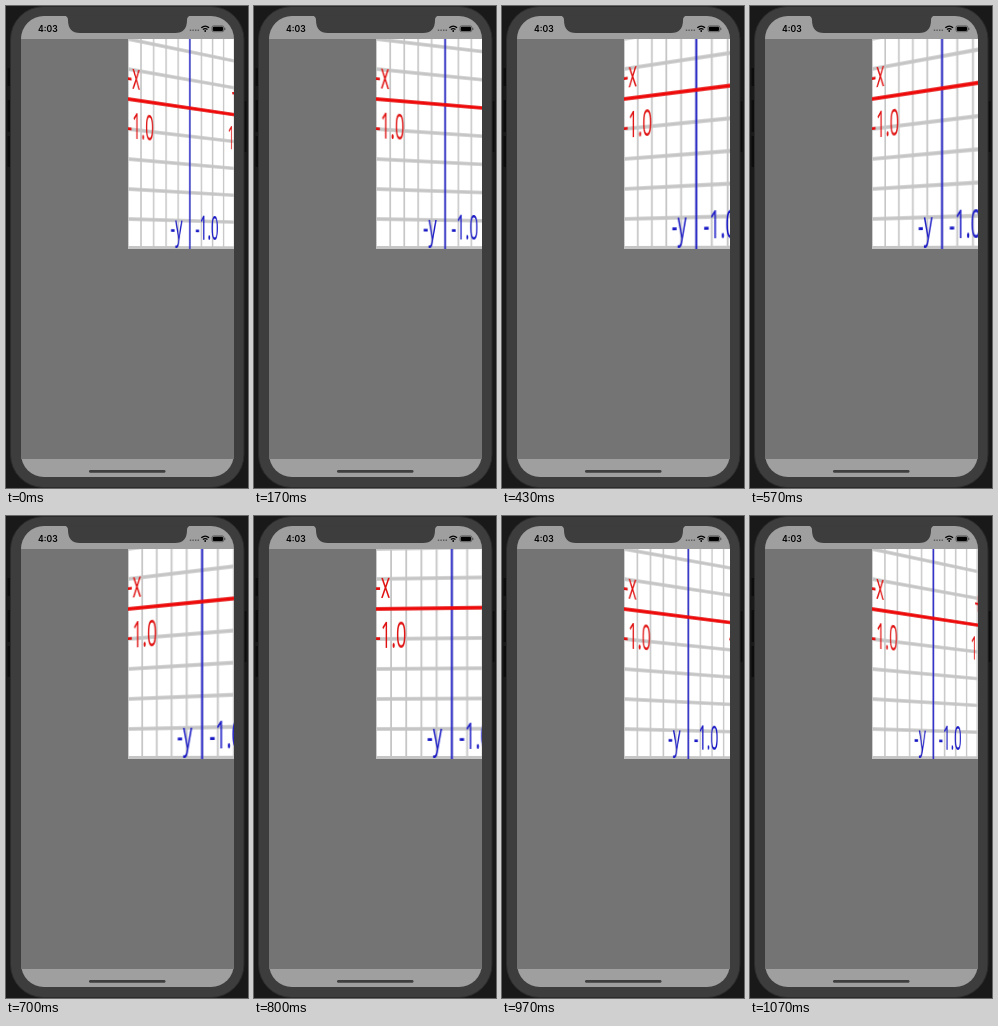
Write an HTML page that moves like this. It is 242 by 482 pixels and loops after 1.11 s.

```html
<!DOCTYPE html>
<html lang="en">
<head>
<meta charset="utf-8">
<title>Swinging coordinate plane</title>
<style>
  html, body { margin: 0; width: 100%; height: 100%; overflow: hidden; background: #191919; }
  #phone { position: absolute; left: 0; top: 0; }
  #view { position: absolute; left: 15px; top: 32.5px; width: 213px; height: 420.5px; overflow: hidden; background: #747474; }
  #plane { position: absolute; left: 106.8px; top: -90px; width: 151px; height: 300px; transform-origin: 0 100%; background: #fff; }
  #plane text { font: 36px "Open Sans", "Noto Sans", sans-serif; }
</style>
</head>
<body>
<svg id="phone" width="242" height="482" viewBox="0 0 242 482">
  <g fill="#0c0c0c">
    <rect x="1.5" y="62" width="5" height="18" rx="1"/>
    <rect x="1.5" y="94" width="5" height="32" rx="1"/>
    <rect x="1.5" y="130" width="5" height="31" rx="1"/>
    <rect x="236" y="95" width="4.5" height="51" rx="1"/>
  </g>
  <rect x="4.5" y=".5" width="233.5" height="481" rx="33" fill="#3d3d3d" stroke="#2b2b2b"/>
  <rect x="15" y="10" width="213" height="461" rx="23" fill="#9f9f9f"/>
  <path d="M58 9.5 Q62 10 62 14 Q62 27 74 27 H169 Q181 27 181 14 Q181 10 185 9.5Z" fill="#3d3d3d"/>
  <rect x="83" y="464" width="76.5" height="2.8" rx="1.4" fill="#3f3f3f"/>
  <text x="32" y="25.8" font-family="Inter, Roboto, sans-serif" font-size="8.6" font-weight="600">4:03</text>
  <path d="M183.8 24.3H193" stroke="#5c5c5c" stroke-width="1.4" stroke-dasharray="1.4 1.2"/>
  <g fill="none" stroke="#000" stroke-width="1.3">
    <path d="M195.3 21.8Q199.2 18.4 203.1 21.8M196.9 23.5Q199.2 21.6 201.5 23.5"/>
    <path d="M199.2 24V26"/>
  </g>
  <rect x="206" y="19.9" width="11.8" height="5.8" rx="1.6" fill="none" stroke="#333" stroke-width=".6"/>
  <rect x="206.8" y="20.7" width="10.2" height="4.2" rx="1"/>
  <path d="M218.8 21.8V24" stroke="#333" stroke-width=".8"/>
</svg>
<div id="view">
  <svg id="plane" viewBox="0 0 300 300" preserveAspectRatio="none">
    <path id="grid" fill="none" stroke="#c5c5c5" stroke-width="3.6"/>
    <path d="M0 298.5H300" stroke="#c5c5c5" stroke-width="3"/>
    <path d="M150 0V300" stroke="#1616c4" stroke-width="3.6"/>
    <path d="M0 150H300" stroke="#f00808" stroke-width="3.6"/>
    <g fill="#e01010">
      <text x="-2" y="139">-x</text>
      <text x="-2" y="189.5">-1.0</text>
      <text x="302" y="139" text-anchor="end">+x</text>
      <text x="302" y="189.5" text-anchor="end">1.0</text>
    </g>
    <g fill="#1616c4">
      <text x="101" y="290.5">-y</text>
      <text x="164" y="290.5">-1.0</text>
    </g>
  </svg>
</div>
<script>
const LOOP = 1110, plane = document.getElementById('plane');

let lines = '';
for (let p = 0; p <= 300; p += 30) lines += `M${p} 0V300M0 ${p}H300`;
document.getElementById('grid').setAttribute('d', lines);

// Cubic ease-in-out (.42, 0, .58, 1), solved by bisection.
function ease(x) {
  if (x <= 0) return 0;
  if (x >= 1) return 1;
  let lo = 0, hi = 1;
  for (let i = 0; i < 20; i++) {
    const s = (lo + hi) / 2, r = 1 - s;
    if (1.26 * r * r * s + 1.74 * r * s * s + s ** 3 < x) lo = s; else hi = s;
  }
  return lo * lo * (3 - 2 * lo);
}

// Swing towards the viewer, a short rest, then swing back.
const angle = t => t < 550
  ? -29.2 + 59.2 * ease((t - 12) / 518)
  : 30 - 60 * ease((t - 563) / 500);

// The picture advances 30 times a second, on 10 ms ticks.
function tick(t) {
  const r = t % 100;
  return Math.min(1070, t - r + (r >= 70 ? 70 : r >= 30 ? 30 : 0));
}

function draw() {
  const t = tick(performance.now() % LOOP);
  plane.style.transform = `perspective(568px) rotateY(${-angle(t)}deg)`;
  requestAnimationFrame(draw);
}
draw();
</script>
</body>
</html>
```
